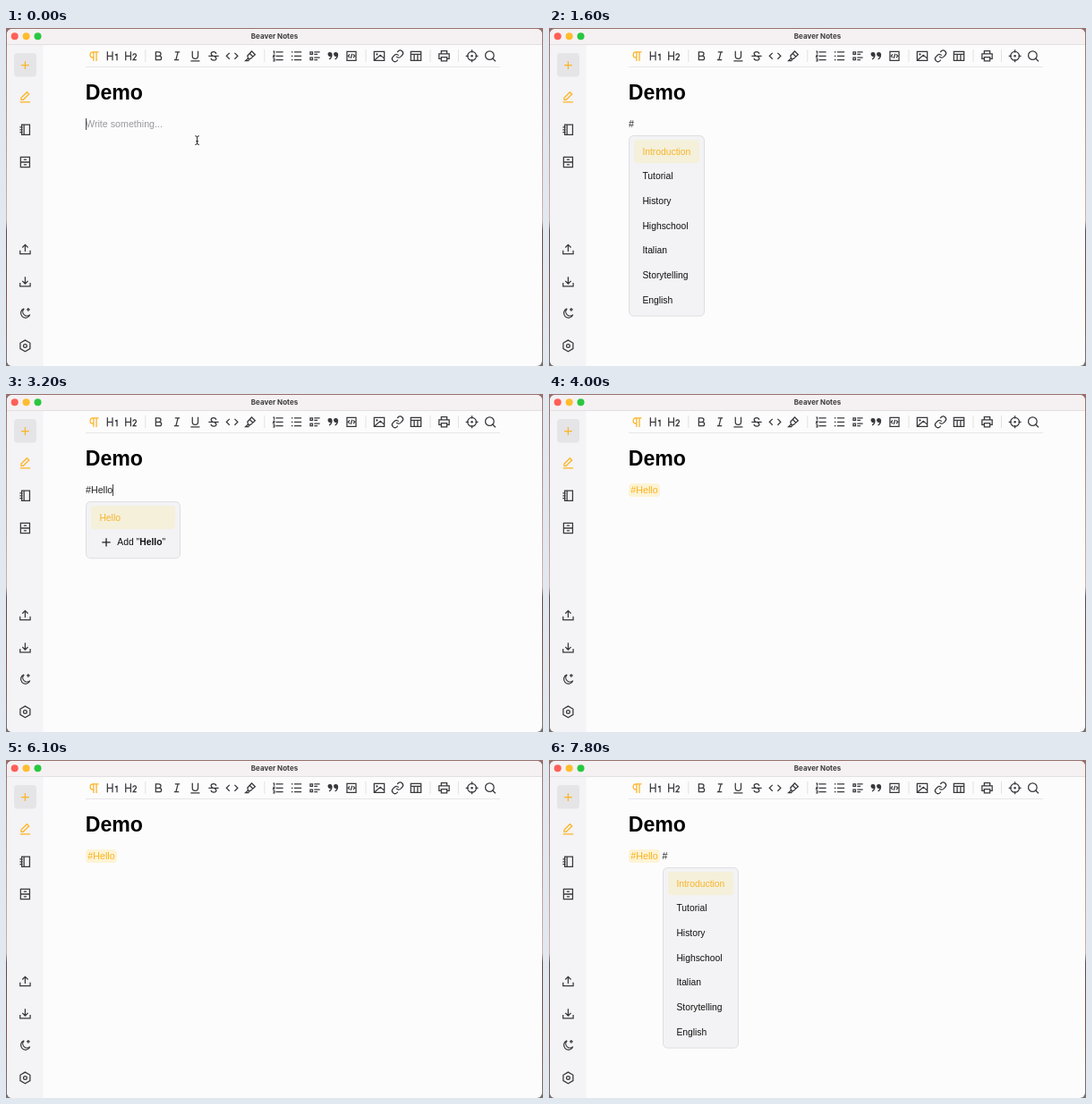
An HTML page that plays this animation: 600x378 px, repeating every 8 s.

```html
<!DOCTYPE html>
<html lang="en">
<head>
<meta charset="utf-8">
<title>Notes demo</title>
<style>
  html, body { margin: 0; width: 100%; height: 100%; overflow: hidden; }
  svg { display: block; width: 600px; height: 378px; }
  text { font-family: "Liberation Sans", Arial, sans-serif; white-space: pre; }
  .body { font-size: 10.7px; }
  .item { font-size: 10.33px; fill: #111; }
  .icon { fill: none; stroke: #38383c; stroke-width: 2; }
  .icon .solid { fill: #38383c; stroke: none; }
  .amber { stroke: #fbb424; }
</style>
</head>
<body>
<svg viewBox="0 0 600 378" xmlns="http://www.w3.org/2000/svg">
  <defs>
    <linearGradient id="desk" x2="0" y2="1">
      <stop offset="0" stop-color="#96706c"/>
      <stop offset=".57" stop-color="#cdb0a8"/>
      <stop offset=".6" stop-color="#5b4a4a"/>
      <stop offset=".8" stop-color="#7d5148"/>
      <stop offset="1" stop-color="#77706f"/>
    </linearGradient>
    <clipPath id="win"><rect x="1" y="1" width="598" height="377" rx="6"/></clipPath>
  </defs>
  <rect width="600" height="378" fill="url(#desk)"/>
  <g clip-path="url(#win)">
    <rect width="600" height="378" fill="#fdfcfd"/>
    <rect y="18" width="41.5" height="360" fill="#f4f3f5"/>
    <rect width="600" height="18" fill="#f5f1f2"/>
    <rect y="18" width="600" height="1" fill="#e3e0e1"/>
  </g>
  <circle cx="9.7" cy="9.3" r="4" fill="#ff5f57"/>
  <circle cx="22.6" cy="9.3" r="4" fill="#febc2e"/>
  <circle cx="35.5" cy="9.3" r="4" fill="#28c840"/>
  <text x="300" y="12" text-anchor="middle" style="font:700 8px Inter,sans-serif" fill="#3c3a3b">Beaver Notes</text>
  <rect x="9" y="28" width="25" height="26.5" rx="4" fill="#e5e4e6"/>
  <g id="icons"></g>
  <rect x="89" y="43" width="463" height="1" fill="#e6e5e7"/>
  <text x="88.8" y="80.4" font-size="23.1" font-weight="700" fill="#000">Demo</text>

  <text id="hint" class="body" x="89" y="111.3" fill="#98979a">Write something...</text>
  <g id="tag">
    <rect x="89" y="100" width="35" height="15" rx="4" fill="#fdf4d6"/>
    <text class="body" x="91.3" y="111.3" fill="#fbb11b">#Hello</text>
  </g>
  <text id="typed" class="body" y="111.3" fill="#222"></text>
  <rect id="caret" y="101" width="1" height="13" fill="#444"/>
  <g id="menu"></g>
  <path id="pointer" d="M211.4 120.7Q213.6 120.7 213.6 122.5V128.7Q213.6 130.5 211.4 130.5M215.8 120.7Q213.6 120.7 213.6 122.5M213.6 128.7Q213.6 130.5 215.8 130.5M212.2 126.8H215" fill="none" stroke="#222"/>
</svg>
<script>
const $ = id => document.getElementById(id);
const LOOP = 8000;

// Icons on a 24-unit grid; an entry is [centre, path, extra markup, class].
const dot = (x, y, r, cls = '') => `<circle cx="${x}" cy="${y}" r="${r}" class="${cls}"/>`;
const quote = 'M6.4 5A3.9 3.9 0 1 0 7.7 12.6C7.3 14.6 6 16 4.4 16.9L5.5 18.6C9 17 10.6 13.6 10.6 10C10.6 7 9 5 6.4 5Z';
const lines = 'M8 5H21M8 12H21M8 19H21';
const heading = 'M3 4V20M12 4V20M3 12H12';
const frame = 'M4 4H20V20H4Z';
const tray = 'M3 14V20H21V14';

const toolbar = [
  [98.5, 'M10 15A5 5 0 0 1 10 5H20M11 5V21M16 5V21', '', 'amber'],
  [119, heading + 'M16.5 10L20 9V20'],
  [139.4, heading + 'M15.8 11A2.9 2.9 0 1 1 21 12.7L16.3 19H22'],
  [170.5, 'M7 5H12.5A3.5 3.5 0 0 1 12.5 12H7ZM7 12H13.5A3.5 3.5 0 0 1 13.5 19H7Z'],
  [191, 'M8.5 5H17M7 19H15.5M13.8 5L10.2 19'],
  [211.4, 'M7 3V12A5 5 0 0 0 17 12V3M4 21H20'],
  [232, 'M3 12H21M16.5 8C16 5.5 14 4.5 12 4.5C9.5 4.5 7.5 5.8 7.5 8C7.5 9.6 8.5 10.6 10 11.4M13 12.6C15 13.2 16.6 14.2 16.6 16.2C16.6 18.4 14.6 19.6 12.2 19.6C9.6 19.6 7.8 18.2 7.3 16'],
  [252.6, 'M7.5 6.5L2 12L7.5 17.5M16.5 6.5L22 12L16.5 17.5'],
  [273, 'M14.5 3.5L20.5 9.5L12.5 17L8 16.5L7 11.5ZM8.5 16L3.5 20.5H8.5L10.5 17.5M11 7.5L16.5 13'],
  [304, lines + 'M3.2 3.6H5V8M3 10.5H5.5L3.5 13.5H6M3 17H5.5V21H3'],
  [324.5, lines + 'M3 5H5.6M3 12H5.6M3 19H5.6'],
  [345, 'M11 5H21M11 9H17M11 15H21M11 19H17M4 5H8V9H4ZM4 15H8V19H4Z'],
  [365.5, '', `<path class="solid" d="${quote}"/><path class="solid" transform="translate(10.4)" d="${quote}"/>`],
  [386, frame + 'M8.8 9L6.2 12L8.8 15M15.2 9L17.8 12L15.2 15M13.2 8L10.8 16'],
  [417, 'M3 4H21V20H3ZM4 19L14 10.5L21 16.5', dot(8, 9, 1.8, 'solid')],
  [437.5, 'M10 13A5 5 0 0 0 17.1 13.7L20.1 10.7A5 5 0 0 0 13 3.6L11.5 5.1M14 11A5 5 0 0 0 6.9 10.3L3.9 13.3A5 5 0 0 0 11 20.4L12.5 18.9'],
  [458, 'M3 4H21V20H3ZM3 9H21M9 9V20M15 9V20'],
  [489.5, 'M7 8V3H17V8M7 17H3V8H21V17H17M7 14H17V21H7Z'],
  [520.6, 'M12 1V6M12 18V23M1 12H6M18 12H23', dot(12, 12, 7.8) + dot(12, 12, 2, 'solid')],
  [541, 'M16.2 16.2L21.5 21.5', dot(11, 11, 7.6)],
];

const sidebar = [
  [41.6, 'M12 5V19M5 12H19', '', 'amber'],
  [77.3, 'M5 16.8V13.2L15.2 3.2L18.8 6.8L8.6 16.8ZM3 20.8H21', '', 'amber'],
  [113.8, 'M6 3H20V21H6ZM10 3V21M2.5 7.5H7.5M2.5 12H7.5M2.5 16.5H7.5'],
  [150, 'M4 3H20V21H4ZM4 12H20M9.5 7.5H14.5M9.5 16.5H14.5'],
  [247.5, tray + 'M12 16V4M7 8.8L12 3.8L17 8.8'],
  [283.8, tray + 'M12 3V15M7 10.5L12 15.5L17 10.5'],
  [319, 'M10 4A8.3 8.3 0 1 0 20.5 14.5A7.3 7.3 0 0 1 10 4ZM17.5 2.5V8.5M14.5 5.5H20.5'],
  [355.4, 'M12 2L20.7 7V17L12 22L3.3 17V7Z', dot(12, 12, 3)],
];

const icon = (x, y, d, extra = '', cls = '') =>
  `<g class="icon ${cls}" transform="translate(${x} ${y}) scale(.63) translate(-12 -12)"><path d="${d}"/>${extra}</g>`;

$('icons').innerHTML =
  toolbar.map(([x, ...rest]) => icon(x, 31.3, ...rest)).join('') +
  sidebar.map(([y, ...rest]) => icon(21.4, y, ...rest)).join('') +
  [155.3, 288.3, 401.5, 473.5, 505].map(x => `<rect x="${x}" y="24" width="1" height="14" fill="#e2e1e4"/>`).join('');

// Suggestion menus: width, items, text offered by the "Add" row.
const labels = ['Introduction', 'Tutorial', 'History', 'Highschool', 'Italian', 'Storytelling', 'English'];
const menus = {
  all: [85, labels],
  H: [89, ['History', 'Highschool', 'Hi', 'Hello'], 'H'],
  He: [95, ['Hello'], 'He'],
  Hell: [100, ['Hello'], 'Hell'],
  Hello: [106, ['Hello'], 'Hello'],
};
const PITCH = 27.65;

function menuMarkup(name, x) {
  const [w, items, add] = menus[name];
  const rows = items.length + (add ? 1 : 0);
  const base = i => 141.8 + i * PITCH;
  let out = `<rect x="${x + .5}" y="120.5" width="${w - 1}" height="${rows * PITCH + 8}" rx="5" fill="#f3f2f4" stroke="#dedde0"/>
    <rect x="${x + 6}" y="125" width="${w - 12}" height="26" rx="4" fill="#f5f0da"/>`;
  items.forEach((s, i) => {
    out += `<text class="item" x="${x + 15.4}" y="${base(i)}"${i ? '' : ' style="fill:#f7b42c"'}>${s}</text>`;
  });
  if (add) {
    const y = base(items.length);
    out += `<path d="M${x + 18.3} ${y - 3.6}h9.4m-4.7 -4.7v9.4" stroke="#222" stroke-width="1.3"/>
      <text class="item" x="${x + 35.3}" y="${y}">Add "<tspan font-weight="700">${add}</tspan>"</text>`;
  }
  return out;
}

// Key presses: time, typed text, menu, tag already placed.
const steps = [
  [-200, '', null, false],
  [1000, '#', 'all', false],
  [1900, '#H', 'H', false],
  [2700, '#He', 'He', false],
  [2800, '#Hel', 'He', false],
  [3000, '#Hell', 'Hell', false],
  [3100, '#Hello', 'Hello', false],
  [3500, '', 'Hello', true],
  [7300, '#', 'all', true],
];
const POINTER_OFF = 100;

const clamp = v => Math.min(1, Math.max(0, v));
const easeOut = v => 1 - (1 - clamp(v)) ** 2;

function menuLevel(t) {
  if (t < 3500) return easeOut((t - 1080) / 250);
  if (t < 7300) return 1 - easeOut((t - 3500) / 200);
  return easeOut((t - 7380) / 250);
}

let shown = null;
let caretX = 89;

function apply(step) {
  const [, text, menu, tagged] = step;
  const left = tagged ? 126.6 : 89;
  $('hint').style.display = text || tagged ? 'none' : '';
  $('tag').style.display = tagged ? '' : 'none';
  $('typed').setAttribute('x', left);
  $('typed').textContent = text;
  caretX = left + (text ? $('typed').getComputedTextLength() : 0);
  $('caret').setAttribute('x', Math.floor(caretX));
  const menuX = tagged && text ? 127 : 89;
  $('menu').innerHTML = menu ? menuMarkup(menu, menuX) : '';
}

function render(t) {
  const step = steps.findLast(s => s[0] <= t);
  if (step !== shown) apply(shown = step);
  const lit = (t - step[0]) % 1000 < 500;
  $('caret').style.opacity = lit ? 1 : 0;
  $('pointer').style.opacity = t < POINTER_OFF ? 1 : 0;
  const p = menuLevel(t);
  $('menu').style.opacity = p;
  $('menu').setAttribute('transform', `translate(0 ${(1 - p) * 5})`);
}

const start = performance.now();
function tick() {
  render((performance.now() - start) % LOOP);
  requestAnimationFrame(tick);
}
tick();
</script>
</body>
</html>
```
